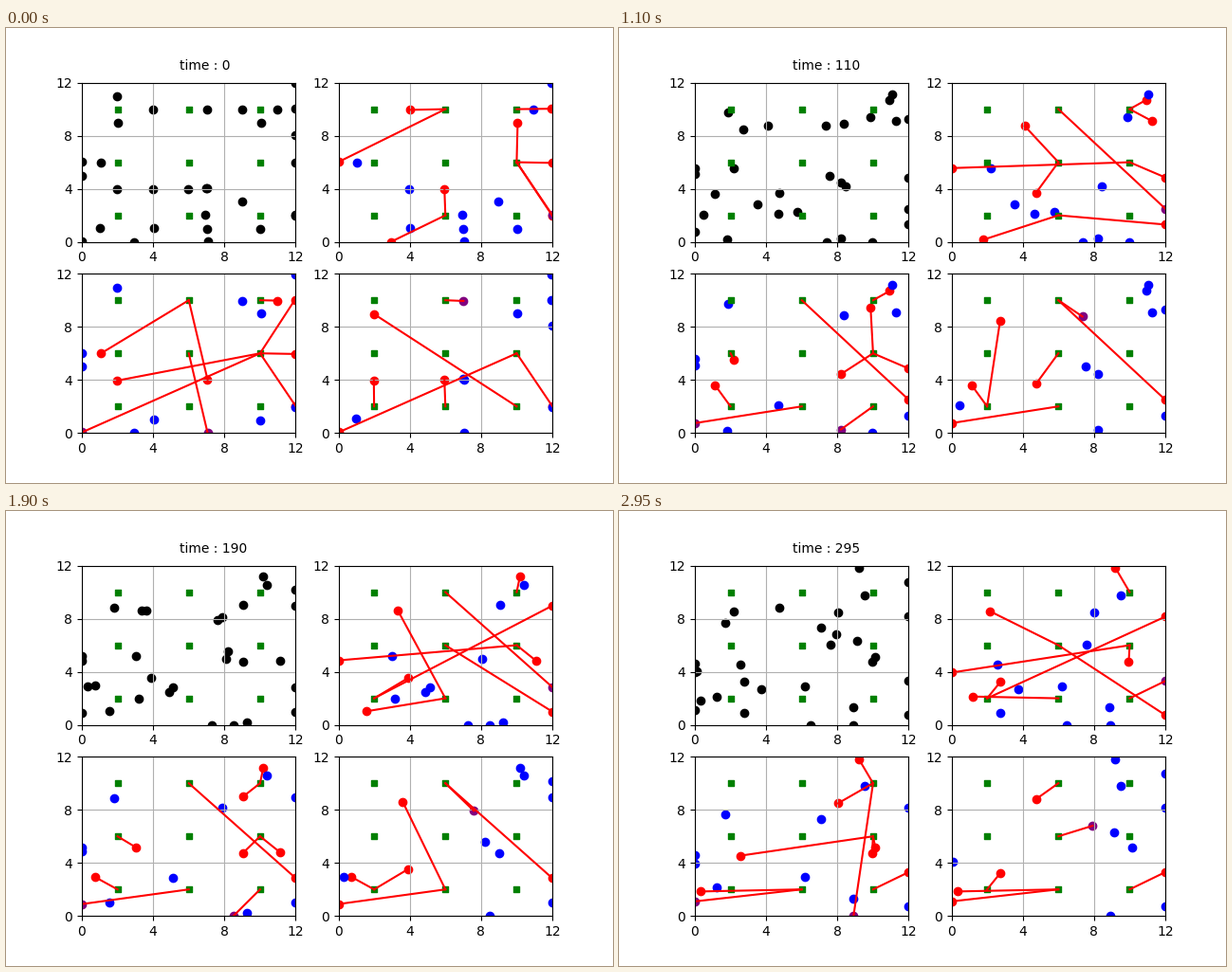
A matplotlib script for the animation above (3000 ms loop, 640 by 480 pixels).

```python
import numpy as np
import matplotlib.pyplot as plt
from matplotlib.animation import FuncAnimation

FRAMES, INTERVAL, STEP = 60, 50, 5
SIZE = 12
SPEED = 1 / 90
PHASE = 50  # time between handovers

# Start x, y, heading in degrees, then any (turn time, new heading).
# Names tell the left, middle or right part of the map.
WALKERS = {
    "L0": (0, 6, 160, 40, 232),
    "L1": (0, 5, 175, 230, 240),
    "L2": (1, 6, 338, 200, 260, 255, 180),
    "L3": (2, 11, 265),
    "L4": (2, 9, 281, 55, 10),
    "L5": (2, 4, 254, 45, 170, 125, 250),
    "L6": (3, 0, 177, 100, 107),
    "L7": (1, 1, 100, 35, 145, 80, 100),
    "L8": (0, 0, 72, 55, 170),
    "M0": (4, 10, 275, 120, 182),
    "M1": (4, 4, 248),
    "M2": (6, 4, 193),
    "M3": (4, 1, 59, 205, 355),
    "M4": (7, 10, 286),
    "M5": (9, 10, 239, 190, 225),
    "M6": (9, 3, 115),
    "M7": (7, 4, 100, 35, 41),
    "M8": (7, 4, 20),
    "M9": (7, 2, 168),
    "M10": (7, 1, 287, 165, 190, 230, 240),
    "M11": (7, 0, 15, 105, 290),
    "R0": (10, 9, 4, 170, 315),
    "R1": (11, 10, 207),
    "R2": (12, 12, 222),
    "R3": (12, 10, 147),
    "R4": (12, 8, 90, 240, 0),
    "R5": (12, 6, 296, 110, 183),
    "R6": (12, 2, 23),
    "R7": (12, 2, 327, 140, 347),
    "R8": (10, 1, 284, 85, 190, 170, 108),
}

STATIONS = dict(zip("SW S SE W C E NW N NE".split(),
                    [(x, y) for y in (2, 6, 10) for x in (2, 6, 10)]))

# Station of each linked walker by phase; the last one is held.
LINKS = [
    {
        "L0": "N N E",
        "L6": "S SW S",
        "M0": "N N C S S S C",
        "M2": "S S C SW",
        "R0": "E E NE NE SW",
        "R3": "NE",
        "R5": "E",
        "R6": "E E N C N N SE",
        "R7": "E E S C C N C",
    },
    {
        "L2": "N N W W W W E",
        "L5": "E SW SW SW SW S",
        "L8": "E S",
        "M8": "N N E",
        "M11": "C C SE SE SE NE",
        "R1": "NE NE E NE",
        "R3": "E NE",
        "R5": "E",
        "R6": "E E N N N N SE",
    },
    {
        "L4": "SE C SW S S N",
        "L5": "SW SW SW SW SW S",
        "L8": "E S",
        "M2": "S S C SW",
        "M4": "N N N N N C",
        "R6": "E E N C N N SE",
    },
]
BLUE = ["L2 M1 M3 M6 M9 M10 M11 R1 R2 R8",
        "L0 L1 L3 L6 M3 M5 R0 R2 R7 R8",
        "L7 M7 M8 M11 R0 R2 R3 R4 R7"]
PURPLE = ["R6", "L8 M11", "M4"]


def place(walker, t):
    """Walk the legs at constant speed, sliding along the walls."""
    x, y, *legs = walker
    turns = [-STEP, *legs[1::2], np.inf]
    for heading, begin, end in zip(np.radians(legs[::2]), turns, turns[1:]):
        dist = SPEED * max(0, min(t, end) - begin)
        x = np.clip(x + dist * np.cos(heading), 0, SIZE)
        y = np.clip(y + dist * np.sin(heading), 0, SIZE)
    return x, y


fig, axes = plt.subplots(2, 2, figsize=(6.4, 4.8), dpi=100)
axes = axes.ravel()
dots = []   # (scatter, walker names)
links = []  # (line, walker name, stations by phase)


def add_dots(ax, names, color):
    spots = [place(WALKERS[n], 0) for n in names]
    dots.append((ax.scatter(*zip(*spots), color=color), names))


add_dots(axes[0], list(WALKERS), "black")
for ax, linked, blue, purple in zip(axes[1:], LINKS, BLUE, PURPLE):
    purple = purple.split()
    add_dots(ax, [n for n in linked if n not in purple], "red")
    add_dots(ax, blue.split(), "blue")
    add_dots(ax, purple, "purple")
    for name, stops in linked.items():
        line, = ax.plot([], [], color="red")
        links.append((line, name, stops.split()))

ticks = range(0, SIZE + 1, 4)
for ax in axes:
    ax.scatter(*zip(*STATIONS.values()), s=16, marker="s", color="green")
    ax.set(xlim=(0, SIZE), ylim=(0, SIZE), xticks=ticks, yticks=ticks)
    ax.grid(True)

label = axes[0].text(5.5, 13, "")


def update(frame):
    t = frame * STEP
    phase = (t + PHASE // 2) // PHASE
    spots = {name: place(walker, t) for name, walker in WALKERS.items()}
    for scatter, names in dots:
        scatter.set_offsets([spots[n] for n in names])
    for line, name, stops in links:
        station = STATIONS[stops[min(phase, len(stops) - 1)]]
        line.set_data(*zip(spots[name], station))
    label.set_text(f"time : {t}")


anim = FuncAnimation(fig, update, frames=FRAMES, interval=INTERVAL,
                     repeat=True, repeat_delay=0)
plt.show()
```
